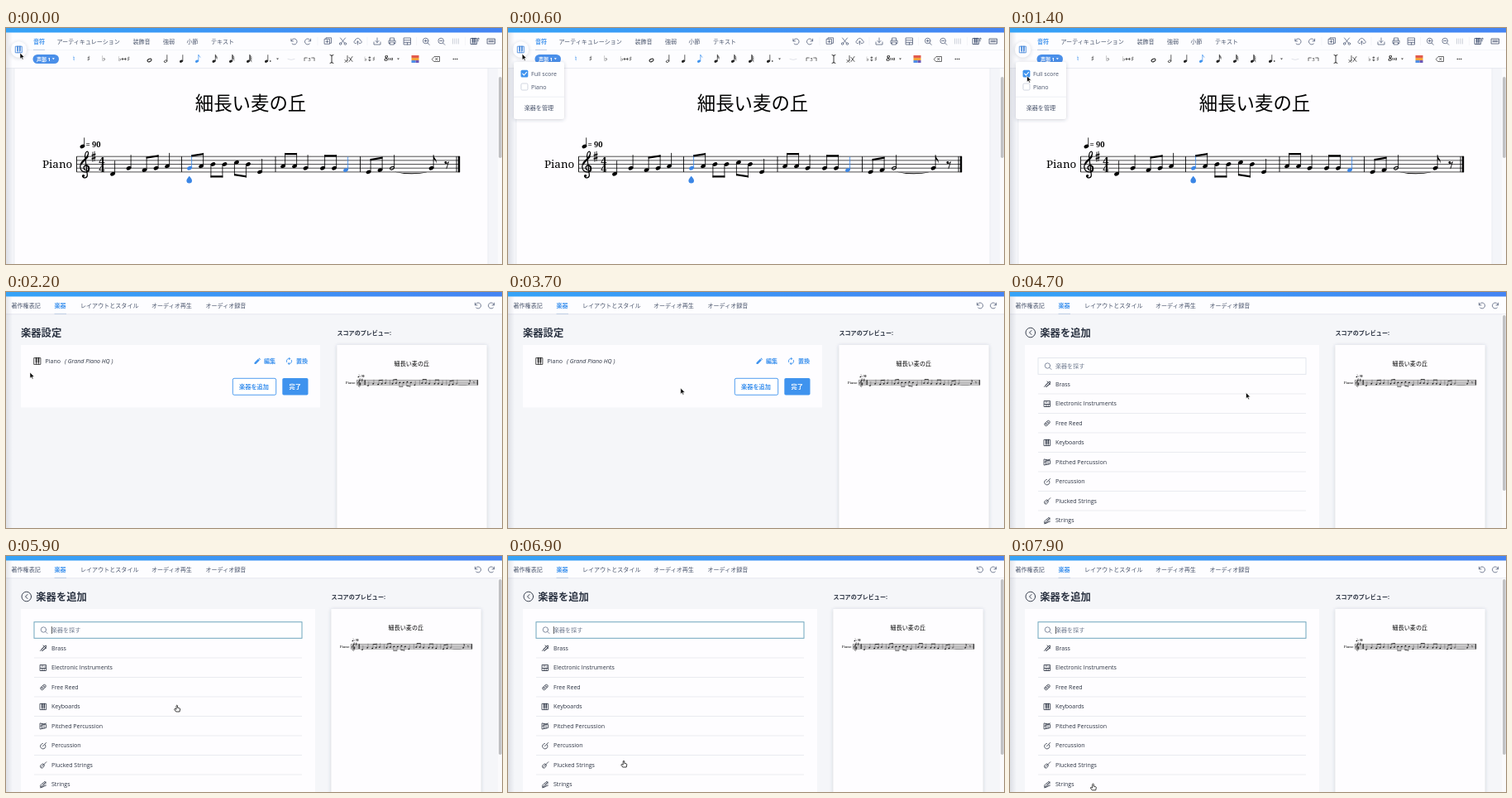
An HTML page that plays this animation: 600x285 px, repeating every 8 s.

```html
<!DOCTYPE html>
<html lang="ja">
<head>
<meta charset="utf-8">
<title>楽器設定</title>
<style>
html, body { margin: 0; width: 100%; height: 100%; overflow: hidden; background: #f5f6f9; }
svg { display: block; width: 100vw; height: 100vh; }
text { font-family: 'Open Sans', 'Noto Sans CJK JP', 'Noto Sans CJK', sans-serif; white-space: pre; }
.serif { font-family: 'Noto Serif', serif; }
.music { font-family: 'DejaVu Sans', sans-serif; }
.ico { fill: none; stroke: #55607a; stroke-width: .8; stroke-linecap: round; stroke-linejoin: round; }
</style>
</head>
<body>
<svg id="stage" viewBox="0 0 600 285" xmlns="http://www.w3.org/2000/svg"></svg>
<script>
const LOOP = 8000, BLUE = '#3f93ee', INK = '#4a556c', DARK = '#2b3342';
const SETTINGS_AT = 2000, ADD_AT = 4700, MENU_AT = 500, FOCUS_AT = 5500;

// Drawing helpers
const text = (x, y, s, size = 7.1, fill = INK, weight = 500, extra = '') =>
  `<text x="${x}" y="${y}" font-size="${size}" fill="${fill}" font-weight="${weight}" ${extra}>${s}</text>`;
const box = (x, y, w, h, fill, extra = '') =>
  `<rect x="${x}" y="${y}" width="${w}" height="${h}" fill="${fill}" ${extra}/>`;
const path = (d, extra = '') => `<path d="${d}" ${extra}/>`;
const icon = (x, y, d, color = '#55607a', width = .8) =>
  `<path class="ico" transform="translate(${x} ${y})" d="${d}" style="stroke:${color};stroke-width:${width}"/>`;
const line = (x1, y1, x2, y2, color, w = .7) =>
  path(`M${x1} ${y1}L${x2} ${y2}`, `stroke="${color}" stroke-width="${w}" fill="none"`);
const pianoIcon = (x, y, r, color) =>
  icon(x, y, `M${-r} ${-r}H${r}V${r}H${-r}Z M${-r / 3} ${r * .3}V${r} M${r / 3} ${r * .3}V${r}`, color) +
  icon(x, y, `M${-r * .36} ${-r}V${r * .3} M${r * .36} ${-r}V${r * .3}`, color, r * .42);

// Score
const GAP = 4.68, BOTTOM = 173.9, STEM = 16;
const pitchY = step => BOTTOM - step * GAP / 2;
const head = (x, y, color = '#000', hollow = false) =>
  `<ellipse rx="${hollow ? 2.6 : 3}" ry="${hollow ? 1.6 : 2.15}" transform="translate(${x} ${y}) rotate(-24)" ` +
  (hollow ? `fill="none" stroke="${color}" stroke-width="1"/>` : `fill="${color}"/>`);
function note(x, step, { up = true, color = '#000', hollow = false } = {}) {
  const y = pitchY(step), sx = x + (up ? 2.6 : -2.6);
  return head(x, y, color, hollow) + line(sx, y, sx, y + (up ? -STEM : STEM), color, .85);
}
function pair(x1, s1, x2, s2, up = true, color = '#000') {
  const dx = up ? 2.6 : -2.6, dy = up ? -STEM : STEM, t = up ? 2.3 : -2.3;
  const a = pitchY(s1) + dy, b = pitchY(s2) + dy;
  return note(x1, s1, { up, color }) + note(x2, s2, { up }) +
    path(`M${x1 + dx - .4} ${a}L${x2 + dx + .4} ${b}v${t}L${x1 + dx - .4} ${a + t}Z`);
}
const sharp = (x, y) => path(`M${x - 1.1} ${y - 5.6}v12M${x + 1.1} ${y - 6.4}v12`, 'stroke="#000" stroke-width=".8"') +
  path(`M${x - 2.4} ${y - 1.3}l4.8 -1.6M${x - 2.4} ${y + 2.9}l4.8 -1.6`, 'stroke="#000" stroke-width="1.5"');

function score() {
  const sel = 'var(--sel)';
  let s = text(296, 99.3, '細長い麦の丘', 22.4, '#000', 500, 'text-anchor="middle"');
  s += text(44, 169, 'Piano', 13.4, '#000', 400, 'class="serif"');
  s += head(92.4, 143) + line(94.7, 143, 94.7, 132.4, '#000', .8);
  s += text(96.4, 144, '= 90', 9.4, '#000', 700, 'class="serif"');
  for (let i = 0; i < 5; i++)
    s += path(`M85.5 ${pitchY(i * 2)}H549`, 'stroke="#222" style="stroke-width:var(--lw)"');
  for (const x of [85.5, 212.5, 326, 428.5, 545]) s += line(x, pitchY(8), x, BOTTOM, '#000', .9);
  s += box(546.8, pitchY(8) - .3, 2.4, GAP * 4 + .6, '#000');
  s += `<g transform="translate(96 ${pitchY(2)}) scale(${GAP})" fill="none" stroke="#000" stroke-linecap="round">` +
    path('M.1 .5C-.6 .4-.6-.6.2-.7C1.2-.7 1.3 .9.1 1C-1.5 1-1.7-.8-.7-1.8C.2-2.6.9-3.2.75-4C.6-4.6 0-4.3-.1-3.2L.5 1.7C.6 2.7-.6 2.7-.75 2', 'stroke-width=".26"') +
    path('M-1.05-1C-.8-1.7.2-2.3.6-3M.3-.65C1.1-.5 1.1.7.4.9', 'stroke-width=".4"') +
    '<circle cx="-.5" cy="2" r=".32" fill="#000" stroke="none"/></g>';
  s += sharp(106, pitchY(8));
  for (const y of [pitchY(4), BOTTOM])
    s += text(116, y, '4', 13.1, '#000', 900, 'class="serif" text-anchor="middle"');
  s += note(129, -1) + note(148.5, 2) + pair(167.5, 1, 181.5, 2) + note(195, 3);
  s += pair(222, 2, 236, 3, true, sel) + pair(250.5, 4, 264.5, 4, false) + pair(279, 5, 293, 4, false) + note(307, 0);
  s += pair(335, 3, 349, 3) + note(362.5, 2) + pair(383, 2, 397, 2) + note(411, 1, { color: sel });
  s += pair(438.5, 0, 452.5, 1) + note(467, 2, { hollow: true }) + note(514.5, 2);
  s += path('M469 173.4Q491 179.2 513 173.4Q491 177.2 469 173.4Z');
  s += path('M517 153.2c.4 4 5.2 5 3.2 10.6c.2-3.6-1.6-5-3.2-5.4Z');
  s += '<circle cx="531.8" cy="162.4" r="1.4"/>' +
    path('M531.4 163.4q2.600 .8 4-1.700l-2.600 8.200', 'fill="none" stroke="#000" stroke-width=".9"');
  return s;
}

// Shared chrome
const topBar = box(0, 0, 600, 5.5, 'url(#bar)');
const leftShade = box(0, 5.5, 8, 280, 'url(#shade)');
const ARC = 'M-3.400-.8A3.500 3.500 0 1 1-2.400 2.500M-3.600-3.300V-.6H-1';
const undo = (x, y) => icon(x, y, ARC);
const redo = (x, y) => `<g transform="translate(${x} ${y}) scale(-1 1)">${icon(0, 0, ARC)}</g>`;
const tabs = (list, active) => list.map(([x, s]) =>
  text(x, 18.7, s, 7.05, s === active ? BLUE : INK, s === active ? 700 : 500)).join('');

function toolbarIcons() {
  const page = 'M-4-3H2V3H-4ZM-2.500-3V-4.500H4V2H2', lens = 'M2.200 2.200L4.300 4.300M3-.5A3.300 3.300 0 1 1-3.600-.5A3.300 3.300 0 1 1 3-.5';
  let s = undo(348.500, 16.5) + redo(365, 16.5);
  s += icon(389.5, 16.300, page + 'M-1-1.500V1.500M-2.500 0H.500');
  s += icon(407.5, 16, 'M-3-4L2 2.200M3-4L-2 2.200M-1.600 3A1.300 1.300 0 1 1-4.200 3A1.300 1.300 0 1 1-1.600 3M4.200 3A1.300 1.300 0 1 1 1.600 3A1.300 1.300 0 1 1 4.200 3');
  s += icon(425.5, 16, 'M-2 2.500H-3C-5.500 2-4.500-1-3-1C-2.500-4.500 2.500-4.500 3-1C5.500-.5 5 2.500 3 2.500H2M0 0V4M-1.300 1.300L0 0L1.300 1.300');
  s += icon(449, 16, 'M0-4V1.500M-2-.5L0 1.500L2-.5M-4 1V4H4V1');
  s += icon(467, 16, 'M-2.500-1V-4H2.500V-1M-2.500 2.500H-4V-1H4V2.500H2.500M-2.500 1H2.500V4H-2.500Z');
  s += icon(485.5, 16, 'M-4-4H4V4H-4ZM-4-1.200H4M-4 1.400H4M0 1.400V4');
  s += icon(508, 16, lens + 'M-.3-2V1M-1.800-.5H1.200') + icon(526.5, 16, lens + 'M-1.800-.5H1.200');
  s += icon(544, 16, 'M-3.500-3V3M-1.200-3V3M1.200-3V3M3.500-3V3', '#c3c8d2');
  s += pianoIcon(566, 16, 3.5, '#344565') + icon(571, 14, 'M0 2V-2L1.500-1', '#344565');
  s += icon(587, 16, 'M-4.500-3H4.500V3H-4.500ZM-3-1H3M-3 .6H3', '#55607a', .9);
  for (const x of [377, 437, 496.5, 555.5]) s += line(x, 11, x, 21, '#eef0f4', .6);
  return s;
}

function noteTools() {
  const glyph = (x, s, color = '#333', size = 9) =>
    text(x, 40.4, s, size, color, 400, 'class="music" text-anchor="middle"');
  let s = box(32.500, 32, 31.500, 11, '#4a8fe9', 'rx="5.500"') + text(37, 39.700, '声部 1', 6, '#fff', 700);
  s += path('M55.800 36.300h3l-1.500 2Z', 'fill="#fff"');
  s += glyph(82, '♮', BLUE) + glyph(100, '♯') + glyph(118, '♭') + glyph(143, '♭↔♯', '#333', 8);
  s += head(173.500, 39, '#222', true);
  [193, 212, 231, 251.500, 272, 293, 315].forEach((x, i) => {
    const color = i === 2 ? BLUE : '#222';
    s += `<g transform="translate(${x} 40.200) scale(.72)">${head(0, 0, color, i === 0)}` + line(2.500, 0, 2.500, -11, color, 1);
    for (let k = 0; k < i - 1 && i < 6; k++)
      s += path(`M2.500 ${-11 + k * 2.400}q.5 2.500 3.500 4.500`, `fill="none" stroke="${color}" stroke-width="1.100"`);
    s += '</g>';
  });
  s += '<circle cx="319.800" cy="40" r=".8"/>';
  for (const x of [328.500, 474.500]) s += path(`M${x - 1.500} 36.500h3l-1.500 2Z`, 'fill="#555"');
  s += icon(345, 37.500, 'M-4 0Q0 2 4 0', '#d8dbe2');
  s += icon(367, 37.500, 'M-6 2V-1.500H-2.800M6 2V-1.500H2.800', '#444') + text(367, 40, '3', 6, '#333', 500, 'text-anchor="middle"');
  s += icon(394, 37.500, 'M0-4.500V4.500M-2-5L0-4L2-5M-2 5L0 4L2 5', '#222', .9);
  s += icon(414, 37.500, 'M-4 4L-1 1M-4 1L-1 4M-1 2V-4M1 3L5-3M1-2L5 3', '#333');
  s += glyph(440, '♭↕♯', '#333', 7.500);
  s += text(457.500, 40, '8<tspan font-size="5" dy="-1.500">va</tspan>', 8, '#222', 600, 'class="serif" font-style="italic"');
  s += box(490.500, 33, 9, 3, '#e25b4d') + box(490.500, 36, 9, 3, '#f3a33c') + box(490.500, 39, 5, 3, '#4f8ee6') + box(495.500, 39, 4, 3, '#6b58b8');
  s += icon(520, 37.500, 'M-4.500 0L-2-3H4.500V3H-2ZM-.5-1.300L2 1.300M2-1.300L-.5 1.300', '#444');
  for (const dx of [-2.200, 0, 2.200]) s += `<circle cx="${543.5 + dx}" cy="37.500" r=".8" fill="#333"/>`;
  return s;
}

function editorScene() {
  let s = box(0, 0, 600, 285, '#f4f5f9') + box(10, 48, 573, 240, '#fefdff', 'stroke="#e6e8ee" stroke-width=".7"');
  s += box(0, 5, 600, 43.5, '#fdfdff') + line(0, 48.6, 600, 48.6, '#e3e6ed', .8) + line(26, 26.6, 600, 26.6, '#eceef4', .6);
  s += box(595, 49, 5, 236, '#fafafc') + box(596, 59, 3.6, 98, '#c1c2c5', 'rx="1.800"');
  s += topBar + leftShade;
  s += tabs([[33, '音符'], [61.5, 'アーティキュレーション'], [153.5, '装飾音'], [190, '強弱'], [218.500, '小節'], [248, 'テキスト']], '音符');
  s += line(33, 26.400, 47, 26.400, '#b9cbe3', .9) + toolbarIcons() + noteTools();
  s += '<use href="#score" style="--sel:#3b86e6;--lw:.8"/>';
  s += path('M221.700 178.800C223.500 181 225 182.500 225 184.300A3.300 3.300 0 0 1 218.400 184.300C218.400 182.500 220 181 221.700 178.800Z', 'fill="#3b86e6"');
  s += '<circle cx="15.500" cy="26" r="9.500" fill="#fdfdff" filter="url(#soft)"/>' + pianoIcon(15.500, 26, 3.8, '#3a80d8');
  s += '<g id="menu">' + box(7, 41, 61, 69, '#fefeff', 'rx="3" filter="url(#soft)"');
  s += box(15.500, 50.800, 8.800, 8.800, BLUE, 'rx="1.500"') + icon(20, 55.200, 'M-2.300 0L-.6 1.800L2.500-1.800', '#fff', 1.1);
  s += box(15.900, 67, 8, 8, '#fff', 'rx="1.500" stroke="#c6ccd8" stroke-width=".8"');
  s += text(28, 57.700, 'Full score', 7.050, INK, 400) + text(28, 73.500, 'Piano', 7.050, INK, 400);
  return s + line(7, 83.200, 68, 83.200, '#e6e9ef') + text(19.700, 98.600, '楽器を管理') + '</g>';
}

function settingsFrame() {
  return box(0, 0, 600, 285, '#f5f6f9') + box(0, 5, 600, 21.500, '#fdfdff') + line(0, 26.800, 600, 26.800, '#e2e5ec', .8) +
    topBar + leftShade +
    tabs([[6.500, '著作権表記'], [58.500, '楽器'], [90, 'レイアウトとスタイル'], [176, 'オーディオ再生'], [241.500, 'オーディオ録音']], '楽器') +
    line(58.500, 26.400, 73, 26.400, '#b9cbe3', .9) + undo(571, 16.500) + redo(587, 16.500);
}
const preview = x => text(x, 51.500, 'スコアのプレビュー:', 7.050, DARK, 700) +
  box(x, 64, 181, 240, '#fefdff', 'filter="url(#soft)"') +
  `<use href="#score" transform="translate(${x - 3.4} 57.200) scale(.3168)" style="--sel:#000;--lw:1.300"/>`;

function settingsScene() {
  let s = settingsFrame() + text(18, 53.700, '楽器設定', 12.300, DARK, 700) + box(18, 64, 362, 75.500, '#fefdff');
  s += pianoIcon(38, 83.500, 3.9, '#222') + text(47.600, 86, 'Piano', 7.050, DARK, 400);
  s += text(71, 86, '( Grand Piano HQ )', 7.050, DARK, 400, 'font-style="italic"');
  s += path('M300.500 87v-1.800l4.500-4.500l1.800 1.800l-4.500 4.500ZM305.500 80.200l.7-.7l1.800 1.800l-.7.7Z', `fill="${BLUE}"`);
  s += text(312, 86.200, '編集', 7.050, BLUE, 700) + text(351, 86.200, '置換', 7.050, BLUE, 700);
  s += icon(342.500, 83.500, 'M-2.900 1.200A3.100 3.100 0 0 1 .8-3M2.900-1.200A3.100 3.100 0 0 1-.8 3M0-4.200L1.200-2.900L0-1.700M0 4.200L-1.200 2.900L0 1.700', BLUE, .9);
  s += box(274.300, 104.300, 52.400, 20, '#fff', `rx="1.800" stroke="${BLUE}" stroke-width=".9"`) + text(282, 117, '楽器を追加', 7.200, BLUE, 700);
  s += box(334.300, 104, 31.200, 20.600, BLUE, 'rx="1.800"') + text(342.500, 117, '完了', 7.200, '#fff', 700);
  return s + preview(400.500);
}

function addScene() {
  const rows = [
    ['Brass', 'M-3.500 3L1-1.500M-1 3L3.500-1.500M0-3.500L3.500 0M-2.500 1.500L2-3L3.500-3.500L3 0L-1.500 3'],
    ['Electronic Instruments', 'M-3.500-3.500H3.500V3.500H-3.500ZM-3.500 .5H3.500M-1.200 .5V3.500M1.200 .5V3.500M-2-2H0M2-2V-1'],
    ['Free Reed', 'M-3 .5L.5-3C2-4 4-2 3-.5L-.5 3C-2 4-4 2-3 .5M-1.500 1.500L1.500-1.500M-2 0L0 2M0-2L2 0'],
    ['Keyboards', ''],
    ['Pitched Percussion', 'M-3.500-3.500L3.500-2V2L-3.500 3.500ZM-1.500-3V3M1-2.500V2.500M-3.500 0L3.500-3.500'],
    ['Percussion', 'M2.500-1A3.200 3.200 0 1 1-.5-2.500M-.5 .8L3.500-3.500'],
    ['Plucked Strings', 'M0 0L3.800-3.800M-.5-1.500C-2-1-3.500 0-3.500 1.800C-3.500 4-.5 4 .3 2.500C.5 1.500 1.500 1 1.500 .5ZM-2 2L0 0'],
    ['Strings', 'M-.5-1.500L2-3.800L3.500-2L1 .5C1 3-3 4-3.500 2.500C-4 1-2-1-.5-1.500M-2.500 2.500L3-3M-3.500 3.800L3.500 1']
  ];
  let s = settingsFrame() + icon(24.800, 49, 'M5.800 0A5.800 5.800 0 1 1-5.800 0A5.800 5.800 0 1 1 5.800 0M1.200-2.500L-1.300 0L1.200 2.500', DARK, .9);
  s += text(36.300, 53.700, '楽器を追加', 12.300, DARK, 700) + box(18, 64, 356, 225, '#fefdff');
  s += '<rect id="search" x="34" y="79.700" width="324" height="19.600" fill="#fefeff"/>';
  s += icon(46, 89.500, 'M2 2L4 4M2.600-.5A3.200 3.200 0 1 1-3.800-.5A3.200 3.200 0 1 1 2.600-.5', '#66728a');
  s += text(55, 92.200, '楽器を探す', 7.050, '#717c90', 400);
  s += '<g id="caret">' + line(55.300, 85, 55.300, 94, '#222', .7) + '</g>';
  rows.forEach(([name, d], i) => {
    const y = 111.500 + 23.500 * i;
    s += (d ? icon(45, y, d, DARK) : pianoIcon(45, y, 3.6, DARK)) + text(55, y + 2.400, name, 7.050, DARK, 400);
    s += line(34, y + 11.500, 358, y + 11.500, '#e1e4ea', .7);
  });
  return s + preview(393.500) + box(595, 27, 5, 258, '#fafafc') + box(596, 28, 3.600, 212, '#c1c2c5', 'rx="1.800"');
}

const stage = document.getElementById('stage');
stage.innerHTML = `<defs>
<linearGradient id="bar"><stop stop-color="#36a3f7"/><stop offset="1" stop-color="#4584f3"/></linearGradient>
<linearGradient id="shade"><stop stop-color="#3c4660" stop-opacity=".13"/><stop offset="1" stop-color="#3c4660" stop-opacity="0"/></linearGradient>
<filter id="soft" x="-30%" y="-30%" width="160%" height="160%"><feDropShadow dx="0" dy=".8" stdDeviation="2" flood-color="#39435a" flood-opacity=".24"/></filter>
<g id="score">${score()}</g></defs>
<g id="editor">${editorScene()}</g><g id="settings">${settingsScene()}</g><g id="add">${addScene()}</g>
<g id="pointer">
<path id="arrow" d="M0 0V7.300L1.700 5.700L2.800 8.200L4 7.700L2.900 5.300H5.200Z" fill="#000" stroke="#fff" stroke-width=".6"/>
<path id="hand" d="M-.8 .8Q0-.5.800 .8V3.300L3.200 3.900Q4 4.200 3.800 5L3.200 8H-1.200L-3.200 5.200Q-2.800 4-1.800 4.600L-.8 5.300Z" fill="#fff" stroke="#111" stroke-width=".8"/>
<path id="beam" d="M-1.500-4Q0-4 0-3V3Q0 4-1.500 4M1.500-4Q0-4 0-3V3Q0 4 1.500 4" fill="none" stroke="#222" stroke-width=".8"/>
</g>`;

const part = {};
for (const id of ['editor', 'settings', 'add', 'menu', 'search', 'caret', 'pointer', 'arrow', 'hand', 'beam'])
  part[id] = document.getElementById(id);
const show = (id, on) => { part[id].style.display = on ? '' : 'none'; };

// Pointer stops: time, x, y
const stops = [[0, 17, 30], [500, 17, 30], [1300, 20.5, 58], [1450, 20.5, 58], [1850, 29, 97], [2900, 29, 97],
  [3700, 208.800, 116], [4500, 285.500, 121.500], [5200, 285.500, 121.500], [5450, 190, 90], [5550, 190, 90],
  [5900, 206.800, 180], [6100, 206.800, 180], [6900, 140, 247], [7700, 100.500, 274.800], [LOOP, 100.500, 274.800]];

function pointerAt(t) {
  const i = stops.findIndex(p => p[0] > t), [t0, x0, y0] = stops[i - 1], [t1, x1, y1] = stops[i];
  const u = (t - t0) / (t1 - t0), e = u * u * (3 - 2 * u);
  return [x0 + (x1 - x0) * e, y0 + (y1 - y0) * e];
}

function render(t) {
  const [x, y] = pointerAt(t), adding = t >= ADD_AT, focused = t >= FOCUS_AT;
  show('editor', t < SETTINGS_AT);
  show('settings', t >= SETTINGS_AT && !adding);
  show('add', adding);
  show('menu', t >= MENU_AT);
  show('caret', focused && (t - FOCUS_AT) % 1000 < 500);
  part.search.setAttribute('stroke', focused ? '#6fa6bd' : '#dce0e8');
  part.search.setAttribute('stroke-width', focused ? 1 : .8);
  const overButton = !adding && x > 274 && y > 104;
  const overField = adding && y < 99.500;
  const overRow = t > 5200 && !overField;
  show('beam', overField);
  show('hand', overButton || overRow);
  show('arrow', !overField && !overButton && !overRow);
  part.pointer.setAttribute('transform', `translate(${x} ${y})`);
}

const start = performance.now();
function tick() {
  render((performance.now() - start) % LOOP);
  requestAnimationFrame(tick);
}
tick();
</script>
</body>
</html>
```
